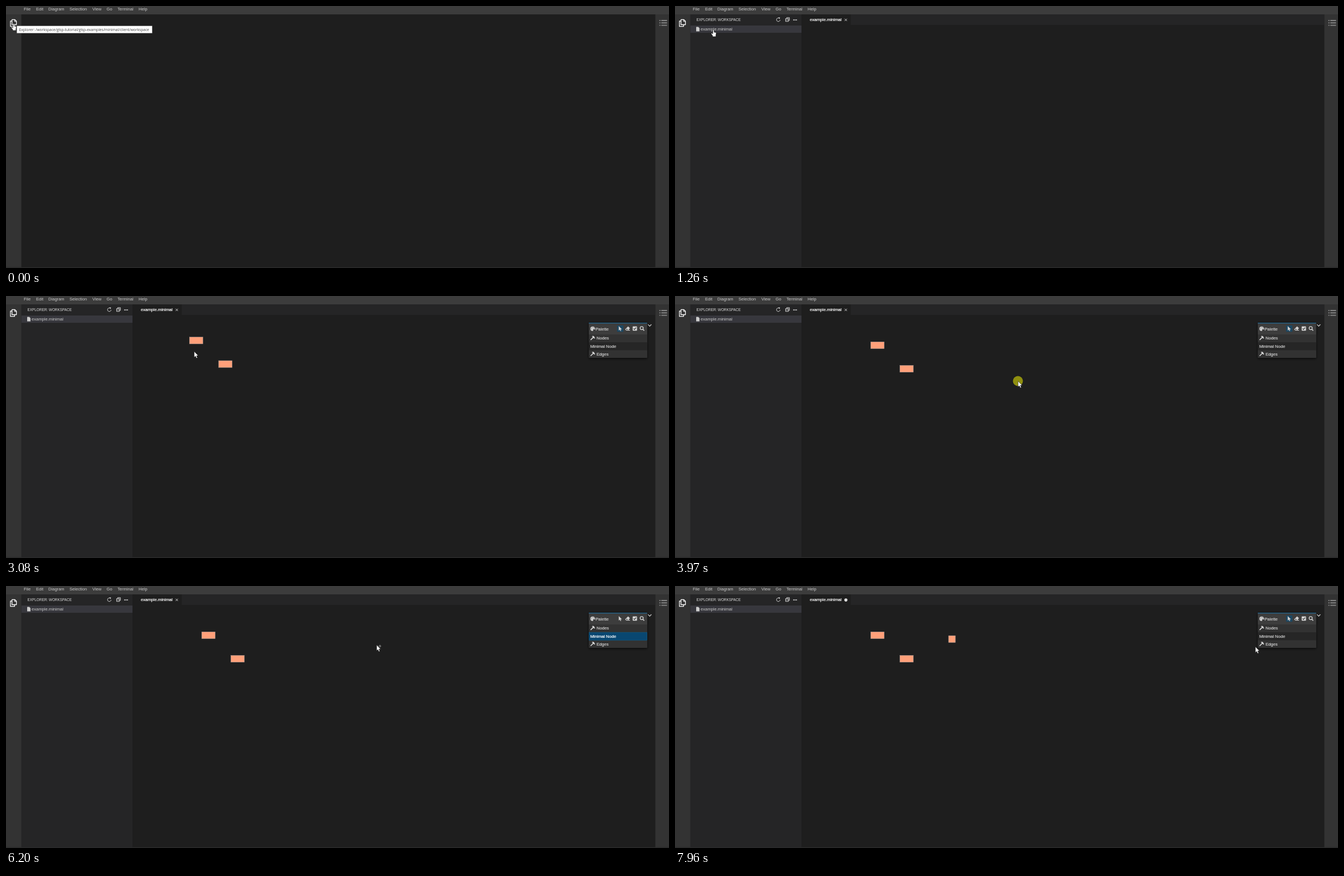
An HTML page that plays this animation: 1190 by 470 pixels, repeating every 8000 ms.

```html
<!DOCTYPE html>
<html lang="en">
<head>
<meta charset="utf-8">
<title>Diagram editor</title>
<style>
  html, body { margin: 0; width: 100%; height: 100%; overflow: hidden; background: #1e1e1e; }
  svg { display: block; width: 100vw; height: 100vh; }
  text { font: 7.6px "Liberation Sans", Arial, sans-serif; fill: #ccc; white-space: pre; }
  .strong { fill: #fff; stroke: #fff; stroke-width: .22; }
  .medium { fill: #d4d4d4; stroke: #d4d4d4; stroke-width: .18; }
  .line { fill: none; stroke: #d4d4d4; stroke-width: 1; }
  .node { fill: #ffa07a; stroke: #9c9a9a; stroke-width: .5; }
</style>
</head>
<body>
<svg viewBox="0 0 1190 470" preserveAspectRatio="none">
  <defs>
    <filter id="shadow" x="-10%" y="-10%" width="120%" height="130%">
      <feDropShadow dx="0" dy="1.5" stdDeviation="2" flood-color="#000" flood-opacity=".7"/>
    </filter>
    <g id="hammer">
      <path d="M.8 7.2 4.8 3.2" stroke="#d4d4d4" stroke-width="1.7" stroke-linecap="round"/>
      <path d="M2.4 1.1Q4.5-.6 6.2 1L7.3 2.1 7.2 3 8.5 4.2 7.3 5.4 6 4.2 5.1 4.2 3.9 3V1.9Z" fill="#d4d4d4"/>
    </g>
  </defs>
  <rect width="1190" height="470" fill="#1e1e1e"/>

  <g id="sidebar">
    <rect x="27" y="15" width="200" height="455" fill="#252526"/>
    <text x="38.5" y="26.9" style="font-size:6.4px;fill:#ddd">EXPLORER: WORKSPACE</text>
    <path class="line" d="M187.4 22.1A3.2 3.2 0 1 0 188.6 25"/>
    <path d="M185.7 20.2 188.6 20.7 187.6 23.6Z" fill="#d4d4d4"/>
    <path class="line" stroke-width=".9" d="M200.5 22V20.9H205.4V25.8H204M198.5 22.6H203.6V27.7H198.5ZM199.7 25.1H202.4"/>
    <path d="M213 24.9h.01M215.5 24.9h.01M218 24.9h.01" stroke="#d4d4d4" stroke-width="2" stroke-linecap="round"/>
    <rect id="row" x="27.5" y="35" width="199.5" height="13"/>
    <path id="file" d="M38 37.6H41.8L44 39.8V45.5H38Z"/>
    <text id="fileName" x="46" y="44.2">example.minimal</text>
  </g>

  <g id="editor">
    <rect x="227" y="15" width="938" height="19" fill="#252526"/>
    <rect x="227" y="15" width="88.5" height="19" fill="#1e1e1e"/>
    <text class="strong" x="242" y="27.4">example.minimal</text>
    <path id="close" d="M304.5 22.8 308.7 27M308.7 22.8 304.5 27" stroke="#ddd" stroke-width=".9"/>
    <circle id="dirty" cx="306.7" cy="25.1" r="2.8" fill="#ddd"/>
  </g>

  <g id="diagram">
    <g id="canvas">
      <rect class="node" x="329.2" y="73.7" width="24.2" height="12.2"/>
      <rect class="node" x="381.7" y="116" width="24.2" height="12.2"/>
      <rect id="created" class="node" x="469" y="80.6" width="12.2" height="12.2"/>
      <g id="selection" fill="#6669b3"></g>
    </g>
    <path class="line" stroke="#ddd" d="M1152.2 51 1155.3 54.1 1158.4 51" style="stroke-width:1.2"/>
    <g filter="url(#shadow)">
      <rect x="1046" y="48" width="104.8" height="63" rx="1" fill="#333"/>
      <rect x="1046" y="48" width="104.8" height="21" fill="#3c3c3c"/>
      <rect x="1046" y="83" width="104.8" height="14.3" fill="#252526"/>
      <rect x="1046" y="48" width="104.8" height="1.1" fill="#236f9e"/>
    </g>
    <rect id="item" x="1046.4" y="83.2" width="104.1" height="14" stroke-width=".7"/>
    <path d="M1053 54.7A4 4 0 0 0 1053 62.8Q1054.4 62.6 1053.9 60.7T1056 59.8 1057.1 58.2A4 4 0 0 0 1053 54.7" fill="#d4d4d4"/>
    <path d="M1051 58.9h.01M1051.7 56.8h.01M1053.8 56.3h.01M1055.4 57.6h.01" stroke="#444" stroke-width="1.1" stroke-linecap="round"/>
    <text class="medium" x="1058.2" y="61.8">Palette</text>
    <rect id="pointerTool" x="1096.8" y="52.8" width="11.4" height="11.4" rx="1" fill="#1d4761"/>
    <path d="M1099.8 54V62.1L1101.7 60.3 1102.9 62.9 1104.2 62.3 1103 59.7H1105.5Z" fill="#d4d4d4"/>
    <path d="M1111.6 59.6 1116 55Q1116.6 54.5 1117.2 55L1119.4 57.2Q1120 57.8 1119.4 58.4L1117 61H1120V62H1113.7L1111.6 60.4Z" fill="#d4d4d4"/>
    <path d="M1112.9 59.9 1114.1 58.6 1116.3 60.7 1115.9 61.1H1114.1Z" fill="#444"/>
    <rect x="1124.8" y="54.4" width="7.8" height="7.8" rx="1" fill="#d4d4d4"/>
    <path d="M1126.4 58.3 1128 60 1131.1 56.6" fill="none" stroke="#3c3c3c" stroke-width="1.2"/>
    <circle class="line" cx="1141" cy="57.6" r="2.8" style="stroke-width:1.3"/>
    <path d="M1143.1 59.7 1145.5 62.1" stroke="#d4d4d4" stroke-width="1.6"/>
    <use href="#hammer" x="1049" y="71.2"/>
    <use href="#hammer" x="1049" y="99.8"/>
    <text class="medium" x="1060" y="78.4">Nodes</text>
    <text id="itemName" class="medium" x="1048.8" y="92.9">Minimal Node</text>
    <text class="medium" x="1060" y="106.9">Edges</text>
  </g>

  <g id="frame">
    <path d="M0 15H27.5V470H0ZM1165.5 15H1190V470H1165.5Z" fill="#333"/>
    <rect width="1190" height="15" fill="#3c3c3c"/>
    <rect y="468.5" width="1190" height="1.5" fill="#2b2b2b"/>
    <g id="menu"></g>
    <path d="M10.8 24.3H15.6L18.7 27.3V33.5H10.8ZM10.6 27H8V36.7H15.4V34" fill="none" stroke="#fff" stroke-width="1.3" stroke-linejoin="round"/>
    <path d="M15.2 24.4V27.7H18.5" fill="none" stroke="#fff"/>
    <path d="M1172.7 26h2M1172.7 30.3h2M1172.7 34.6h2M1176.2 26H1186.5M1176.2 30.3H1186.5M1176.2 34.6H1186.5" stroke="#858585" stroke-width="1.9"/>
  </g>

  <g id="tooltip">
    <rect x="19.3" y="35.8" width="243" height="13" fill="#fff" stroke="#777" stroke-width=".5"/>
    <text x="23.6" y="44.8" style="font:6.64px 'Open Sans','Noto Sans',sans-serif;fill:#444">Explorer: /workspace/glsp-tutorial/glsp-examples/minimal/client/workspace</text>
  </g>

  <g id="cursor">
    <circle id="press" r="9" fill="#ff0" fill-opacity=".5"/>
    <path id="arrow" d="M.3.3V10.6L2.6 8.5 4.2 12.2 6 11.4 4.4 7.8H7.5Z" fill="#fff" stroke="#111" stroke-width=".5"/>
    <path id="plus" d="M6.2.5 8 2.3 6.2 4.1 4.4 2.3Z" fill="#1e1e1e" stroke="#ddd" stroke-width=".8"/>
    <path id="hand" d="M-1.1.8Q0-.7 1.1.8V4.4L4.1 5Q5 5.3 5 6.4L4.3 10V12.4H-1.5V10.8L-4 7.4Q-4.3 5.9-2.8 6.2L-1.1 7.6Z" fill="#fff" stroke="#111" stroke-width=".6"/>
  </g>
</svg>
<script>
const LOOP = 8000;
const el = id => document.getElementById(id);
const show = (id, on) => el(id).setAttribute('display', on ? 'inline' : 'none');
const paint = (id, attrs) => Object.entries(attrs).forEach(([k, v]) => el(id).setAttribute(k, v));
const within = (t, from, to) => t >= from && t < to;

const menu = { File: 32, Edit: 54, Diagram: 76, Selection: 114, View: 155, Go: 180.5, Terminal: 200, Help: 238 };
el('menu').innerHTML = Object.entries(menu)
  .map(([label, x]) => `<text x="${x}" y="8.2">${label}</text>`).join('');

el('selection').innerHTML =
  '<rect width="24.2" height="12.2" fill="none" stroke="#504d80" stroke-width=".9"/>' +
  [[0, 0], [24, 0], [0, 12], [24, 12]]
    .map(([x, y]) => `<circle cx="${x}" cy="${y}" r="4.2"/>`).join('');

// time, x, y of the pointer tip
const path = [
  [0, 13.5, 31.5], [390, 13.5, 31.5], [700, 69, 42.5], [1300, 69, 42.5],
  [1780, 340, 84], [1910, 340, 84], [2040, 384.5, 112.5], [2240, 392, 120],
  [2520, 392, 120], [2780, 323, 78], [2920, 323, 78], [3100, 338, 100],
  [3200, 338, 100], [3420, 360, 108.5], [3720, 615.5, 152.5], [4080, 615.5, 152.5],
  [4720, 1044, 101], [4820, 1045, 101], [5160, 1065.5, 90.5], [5650, 1065.5, 90.5],
  [6140, 665, 105.5], [6250, 665, 105.5], [6730, 497, 95], [7100, 497, 95],
  [7600, 930, 117], [7860, 1038, 110], [7959, 1038, 110], [7960, 1041.5, 108.8], [LOOP, 1041.5, 108.8]
];
const clicks = [[290, 390], [1000, 1070], [1120, 1190], [1800, 1900], [2380, 2480],
  [2800, 2890], [3200, 3400], [3970, 4070], [5540, 5640], [6780, 6880]];

const smooth = p => p * p * (3 - 2 * p);

function pointer(t) {
  const i = path.findIndex(k => k[0] > t);
  const [t0, x0, y0] = path[i - 1], [t1, x1, y1] = path[i];
  const p = smooth((t - t0) / (t1 - t0));
  return [x0 + (x1 - x0) * p, y0 + (y1 - y0) * p];
}

function draw(t) {
  const hand = t < 1340;
  const focused = t < 1260;
  const armed = within(t, 5600, 6850);
  const hovered = within(t, 4900, 5600);
  const saved = t < 6850;

  show('tooltip', t < 290);
  show('sidebar', t >= 380);
  show('editor', t >= 1240);
  show('diagram', t >= 1380);

  paint('row', { fill: focused ? '#094771' : '#37373d' });
  paint('file', { fill: focused ? '#fff' : '#ccc' });
  paint('fileName', { class: focused ? 'strong' : '' });

  show('close', saved);
  show('dirty', !saved);
  show('created', !saved);
  show('pointerTool', !armed);
  paint('item', {
    fill: armed ? '#094771' : 'none',
    stroke: armed || hovered ? '#125c86' : 'none'
  });
  paint('itemName', { class: armed ? 'strong' : 'medium' });

  const pan = smooth(Math.min(1, Math.max(0, (t - 3200) / 220)));
  paint('canvas', { transform: `translate(${22 * pan} ${8.5 * pan})` });
  show('selection', within(t, 1830, 2820));
  paint('selection', { transform: t < 2400 ? 'translate(329.2 73.7)' : 'translate(381.7 116)' });

  paint('cursor', { transform: `translate(${pointer(t)})` });
  show('press', clicks.some(([from, to]) => within(t, from, to)));
  show('hand', hand);
  show('arrow', !hand);
  show('plus', armed && t >= 5740);
}

const start = performance.now();
function tick() {
  draw((performance.now() - start) % LOOP);
  requestAnimationFrame(tick);
}
tick();
</script>
</body>
</html>
```
